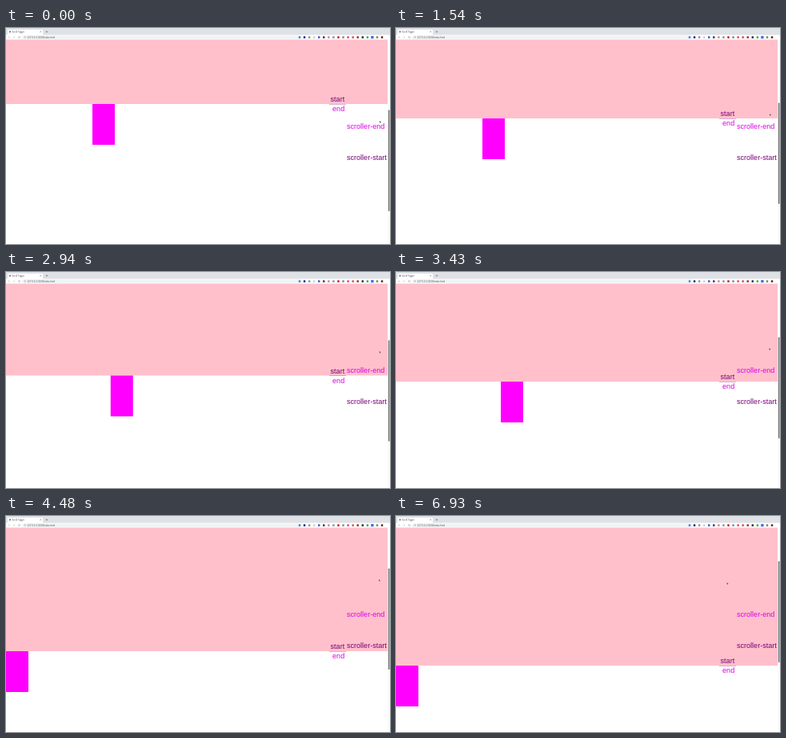
An HTML page that plays this animation: 480x270 px, repeating every 7 s.

```html
<!DOCTYPE html>
<html lang="en">
<head>
<meta charset="utf-8">
<title>Scroll markers</title>
<style>
  html, body { margin: 0; width: 100%; height: 100%; overflow: hidden; background: #fff; }
  svg { display: block; width: 100vw; height: 100vh; }
  text { font-family: "Liberation Sans", Arial, sans-serif; }
  .marker { font-size: 9.05px; }
  .start { fill: #780078; }
  .end { fill: #dc00e4; }
  .tiny { font-size: 3px; fill: #55585c; }
</style>
</head>
<body>
<svg viewBox="0 0 480 270">
  <rect width="480" height="270" fill="#fff"/>
  <rect id="panel" y="14" width="477" fill="#ffc0cb"/>
  <rect id="box" width="28" height="51" fill="#f0f"/>

  <g class="marker">
    <g id="pair">
      <rect x="404" y="0" width="21" height=".5" fill="#800080" opacity=".6"/>
      <text class="start" x="423.2" y="-2.7" text-anchor="end">start</text>
      <text class="end" x="423.2" y="9.3" text-anchor="end">end</text>
    </g>
    <text class="end" x="426" y="126.2">scroller-end</text>
    <text class="start" x="426" y="165.2">scroller-start</text>
  </g>

  <rect x="477" y="14" width="3" height="256" fill="#fafafa"/>
  <rect id="thumb" x="477.8" width="1.7" height="126.5" rx=".8" fill="#777"/>

  <g id="chrome">
    <rect width="480" height="9" fill="#dee1e6"/>
    <path d="M1 9q1 0 1-1V3q0-1 1-1H45q1 0 1 1V8q0 1 1 1z" fill="#fff"/>
    <rect y="8.6" width="480" height="5.9" fill="#fff"/>
    <rect x="20" y="9.3" width="350" height="4.4" rx="2.2" fill="#f1f3f4"/>
    <circle cx="5" cy="4.7" r="1.1" fill="#777b80"/>
    <text class="tiny" x="7.6" y="5.8" style="font-size:2.6px">Scroll Trigger</text>
    <path d="M42.5 4l1.4 1.4m0-1.4l-1.4 1.4M49.6 4.7h2.6m-1.3-1.3v2.6" stroke="#555" stroke-width=".45"/>
    <path d="M5 11.5H3m.8-.8l-.8.8.8.8M9 11.5h2m-.8-.8l.8.8-.8.8" fill="none" stroke="#aaa" stroke-width=".4"/>
    <circle cx="16.5" cy="11.5" r="1" fill="none" stroke="#777" stroke-width=".4"/>
    <circle cx="23.8" cy="11.5" r=".8" fill="none" stroke="#777" stroke-width=".4"/>
    <text class="tiny" x="26.6" y="12.6" style="font-size:3px">127.0.0.1:5500/index.html</text>
  </g>

  <path id="cursor" d="M0 0V2.6L.65 2.1 1.1 3 1.6 2.8 1.2 1.9 1.9 1.8z" fill="#111" stroke="#fff" stroke-width=".25"/>
</svg>
<script>
const LOOP = 7000, STEP = 70;
const $ = id => document.getElementById(id);
const set = (id, attrs) => {
  for (const key in attrs) $(id).setAttribute(key, attrs[key]);
};

// [time, y] of the panel's lower edge
const EDGE = [
  [0, 95], [700, 103.5], [1540, 113], [2240, 124], [3080, 130.5],
  [3430, 137], [3850, 150.5], [4480, 169], [4620, 172], [5390, 180],
  [5460, 181], [5670, 183], [5740, 183], [6440, 187], [7000, 187]
];
// [time, x] and [time, y] of the pointer
const POINTER_X = [[0, 467], [2240, 467], [4480, 466], [6720, 465.7], [6930, 413.7]];
const POINTER_LIFT = [[0, 0], [6720, 0], [6930, 13]];

function lerp(table, t) {
  const i = table.findIndex(p => p[0] > t);
  if (i < 0) return table[table.length - 1][1];
  const [t0, v0] = table[i - 1], [t1, v1] = table[i];
  return v0 + (v1 - v0) * (t - t0) / (t1 - t0);
}

// The tween resumes on entering the zone and resets on leaving it.
const RESUME = 1810, REST = 1257, FAR = 131, HELD = 108;
function boxX(t, edge) {
  if (edge >= 168) return 0;
  const p = Math.min(1, Math.max(0, (t - RESUME) / REST));
  return FAR - (FAR - HELD) * (1 - p) ** 2;
}

function draw(t) {
  const edge = lerp(EDGE, t);
  const top = 102.5 - (edge - 95) / 2;
  set("panel", { height: edge - 14 });
  set("box", { x: boxX(t, edge), y: edge });
  set("pair", { transform: `translate(0 ${edge})` });
  set("thumb", { y: top });
  const y = top + 13.4 + lerp(POINTER_LIFT, t);
  set("cursor", { transform: `translate(${lerp(POINTER_X, t)} ${y})` });
}

// Toolbar buttons
const COLORS = ["#4a8be0", "#33307e", "#999", "#ccd2da", "#4c62c8", "#454d58", "#d98a9a", "#999",
  "#d3232f", "#8b8f94", "#e0527a", "#e25a4a", "#b5342c", "#24453a", "#5aa667", "#3f6fe8", "#8a8a6a", "#6b3325"];
COLORS.forEach((fill, i) => {
  const r = document.createElementNS("http://www.w3.org/2000/svg", "rect");
  const size = i === 15 ? 3.4 : 2.6;
  const attrs = { x: 367 + i * 6.06 - size / 2, y: 11.6 - size / 2, width: size, height: size, rx: .6, fill };
  for (const key in attrs) r.setAttribute(key, attrs[key]);
  $("chrome").append(r);
});

const begin = performance.now();
function tick() {
  const t = (performance.now() - begin) % LOOP;
  draw(Math.floor(t / STEP) * STEP);
  requestAnimationFrame(tick);
}
draw(0);
requestAnimationFrame(tick);
</script>
</body>
</html>
```
